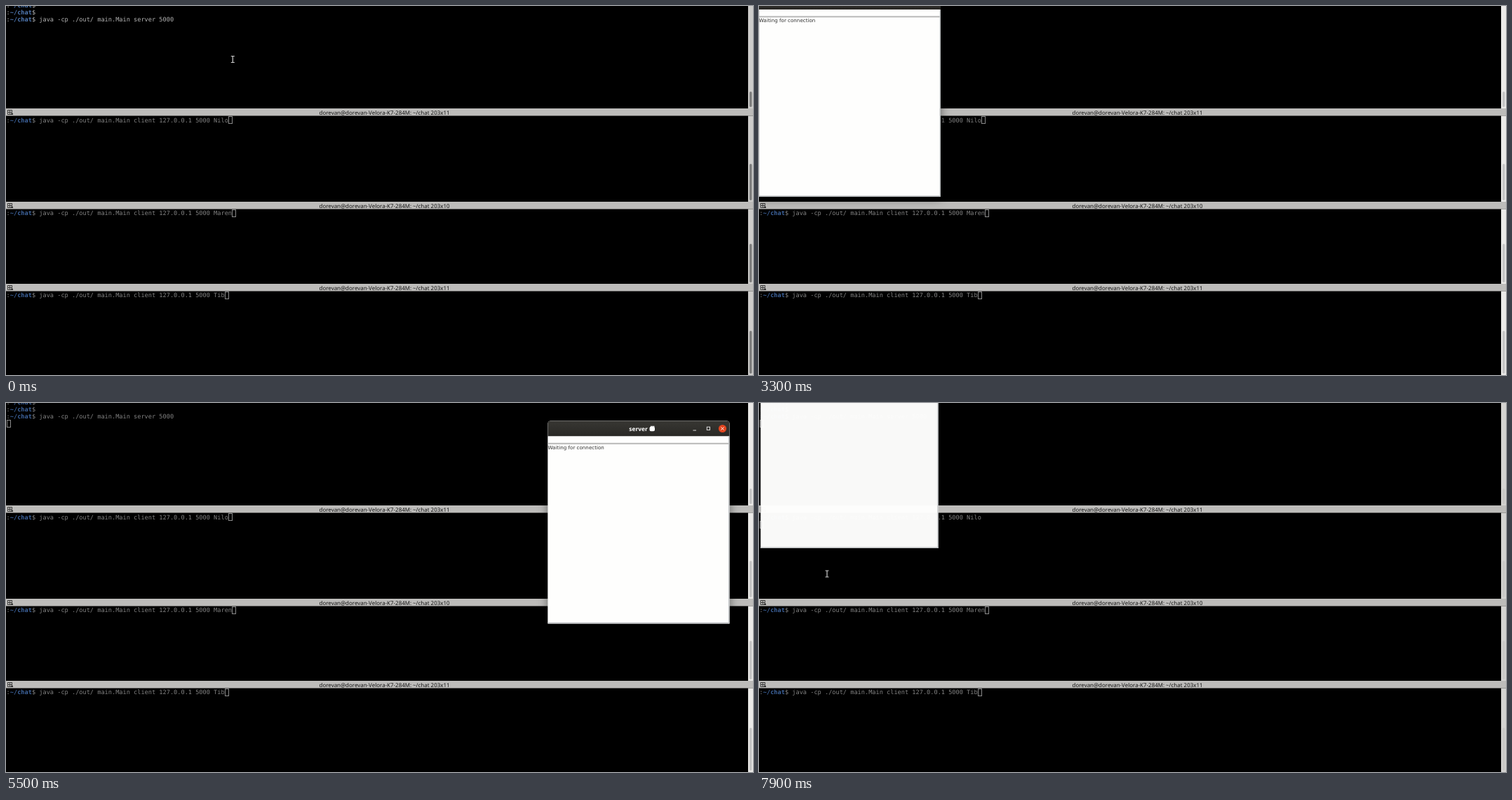
An HTML page with a canvas that plays this animation: 1065 by 526 pixels, repeating every 8 s.

```html
<!DOCTYPE html>
<html lang="en">
<head>
<meta charset="utf-8">
<title>Chat terminals</title>
<style>
html, body { margin: 0; width: 100%; height: 100%; overflow: hidden; background: #000; }
canvas { display: block; }
</style>
</head>
<body>
<canvas id="stage" width="1065" height="526"></canvas>
<script>
const ctx = document.getElementById('stage').getContext('2d');
ctx.textRendering = 'geometricPrecision';

const LOOP = 8000, STEP = 100;
const CELL = 5.19, LEFT = 0.6, ROW = 10.3;
const MONO = '8.62px "DejaVu Sans Mono", monospace';
const WIN_W = 259, WIN_H = 289;
const CLIENT = 'java -cp ./out/ main.Main client 127.0.0.1 5000 ';

// top / bottom of the text area, first full row, scrollbar thumb
const panes = [
  { top: 0, end: 146, row: 14, thumb: [122, 144], cmd: 'java -cp ./out/ main.Main server 5000' },
  { top: 156.5, end: 279, row: 157.3, thumb: [225, 277], cmd: CLIENT + 'Nilo', size: '203x11' },
  { top: 289.5, end: 396, row: 290.2, thumb: [339, 394], cmd: CLIENT + 'Maren', size: '203x10' },
  { top: 406.5, end: 526, row: 407.2, thumb: [463, 524], cmd: CLIENT + 'Tib', size: '203x11' }
];

// time, x, y of the server window
const winPath = [
  [3900, 0, -17], [4000, 0, 0], [4100, 0, 17], [4200, 0, 25],
  [4800, 0, 25], [4900, 60, 27], [5100, 344.5, 31], [5300, 600, 28.5],
  [5500, 772.5, 25.5], [5700, 791.5, 21], [5800, 793, 13], [5900, 794, 8]
];
const mousePath = [[5900, 924, 18], [6100, 700, 85], [6300, 360, 175], [6400, 323, 188]];

function along(path, t) {
  if (t <= path[0][0]) return path[0].slice(1);
  for (let i = 1; i < path.length; i++) {
    const [t0, x0, y0] = path[i - 1], [t1, x1, y1] = path[i];
    if (t <= t1) {
      const k = (t - t0) / (t1 - t0);
      return [x0 + (x1 - x0) * k, y0 + (y1 - y0) * k];
    }
  }
  return path[path.length - 1].slice(1);
}

function rect(x, y, w, h, color) {
  ctx.fillStyle = color;
  ctx.fillRect(x, y, w, h);
}

function frame(x, y, w, h, color, width = 1) {
  ctx.strokeStyle = color;
  ctx.lineWidth = width;
  ctx.strokeRect(x, y, w, h);
}

function text(str, x, y, font, color, align = 'left') {
  ctx.font = font;
  ctx.fillStyle = color;
  ctx.textAlign = align;
  ctx.fillText(str, x, y);
}

function line(width, color, ...points) {
  ctx.strokeStyle = color;
  ctx.lineWidth = width;
  ctx.beginPath();
  for (let i = 0; i < points.length; i += 4) {
    ctx.moveTo(points[i], points[i + 1]);
    ctx.lineTo(points[i + 2], points[i + 3]);
  }
  ctx.stroke();
}

function prompt(cellTop, cmd, bright) {
  const y = cellTop + 8.2, color = bright ? '#b4b4b4' : '#828282';
  text(':', LEFT, y, MONO, color);
  text('~/chat', LEFT + CELL, y, 'bold ' + MONO, bright ? '#5079b4' : '#3d639c');
  text('$ ' + cmd, LEFT + 7 * CELL, y, MONO, color);
}

function caret(col, cellTop, style) {
  const x = Math.round(LEFT + col * CELL), y = Math.round(cellTop);
  if (style === 'solid') rect(x, y, 5.5, 10.3, '#b4b4b4');
  if (style === 'hollow') frame(x + 0.5, y + 0.5, 5, 10, '#8a8a8a');
}

function titleBar(y, size) {
  rect(0, y, 1065, 10.5, '#bdbcba');
  frame(2.5, y + 2.5, 6, 6, '#333', 0.9);
  line(0.9, '#333', 5.5, y + 2.5, 5.5, y + 8.5, 2.5, y + 5.5, 8.5, y + 5.5);
  rect(7, y + 7, 3, 2, '#333');
  text('dorevan@dorevan-Velora-K7-284M: ~/chat ' + size, 539.5, y + 8.6,
    '7.93px "Noto Sans", sans-serif', '#111', 'center');
}

function scrollbar(pane, t) {
  const active = t < 2400 || (t >= 6600 && t < 7900);
  const fading = t >= 7900 || (t >= 2400 && t < 2700);
  rect(1058, pane.top, 7, pane.end - pane.top, active ? '#cecdcb' : fading ? '#d4d3d1' : '#ebeae8');
  if (t >= 2400 && t < 2700) return;
  const [a, b] = pane.thumb;
  ctx.fillStyle = active ? '#7d7d7d' : fading ? '#c9c8c6' : '#c4c4c4';
  ctx.beginPath();
  ctx.roundRect(1060, a, 3.5, b - a, 1.7);
  ctx.fill();
}

function terminals(t) {
  const focus = t < 2400 ? 0 : t >= 6600 && t < 7900 ? 1 : -1;
  const entered = [t >= 2000, t >= 7000];
  const blinkOn = focus ? t < 7700 : t >= 2000 || (t >= 300 && t < 900) || t >= 1500;
  panes.forEach((p, i) => {
    if (p.size) titleBar(p.top - 10.5, p.size);
    if (!i) {
      prompt(p.row - 2 * ROW, '', focus === 0);
      prompt(p.row - ROW, '', focus === 0);
    }
    prompt(p.row, p.cmd, focus === i);
    const style = focus !== i ? 'hollow' : blinkOn ? 'solid' : 'none';
    caret(entered[i] ? 0 : 9 + p.cmd.length, p.row + (entered[i] ? ROW : 0), style);
    scrollbar(p, t);
  });
}

// App window centred on (cx, cy), growing and fading in with s
function appWindow(cx, cy, s, title, message) {
  ctx.save();
  ctx.globalAlpha = s;
  ctx.translate(cx, cy);
  ctx.scale(s, s ** 0.95);
  ctx.translate(-WIN_W / 2, -WIN_H / 2);

  ctx.save();
  ctx.beginPath();
  ctx.roundRect(0, 0, WIN_W, WIN_H, [4, 4, 0, 0]);
  if (s === 1) {
    ctx.shadowColor = 'rgba(0,0,0,.5)';
    ctx.shadowBlur = 14;
    ctx.shadowOffsetY = 2;
    ctx.fillStyle = '#fefefd';
    ctx.fill();
    ctx.shadowColor = 'transparent';
  }
  ctx.clip();
  const bar = ctx.createLinearGradient(0, 0, 0, 22);
  bar.addColorStop(0, '#383733');
  bar.addColorStop(1, '#292825');
  rect(0, 0, WIN_W, 22, bar);
  rect(0, 22, WIN_W, WIN_H - 22, '#fefefd');
  rect(0, 31.3, WIN_W, 2, '#b9b9b9');
  rect(WIN_W - 1.5, 22, 1.5, WIN_H - 22, '#bcbfc1');
  rect(0, WIN_H - 1.7, WIN_W, 1.7, '#bcbfc1');
  rect(0, 22, 0.6, WIN_H - 22, '#c8c8c8');
  ctx.restore();

  text(title, 129, 14.2, 'bold 8.4px "Noto Sans", sans-serif', '#fff', 'center');
  line(1, '#ddd', 207, 13.5, 211.5, 13.5);
  frame(226.8, 8.7, 4.2, 4.2, '#ddd');
  ctx.fillStyle = '#e2451f';
  ctx.beginPath();
  ctx.arc(249, 11, 5.6, 0, 7);
  ctx.fill();
  line(1, '#fff', 247, 9, 251, 13, 251, 9, 247, 13);
  text(message, 0, 40.4, '7.14px "DejaVu Sans", sans-serif', '#333');
  ctx.restore();
}

function beam(x, y) {
  line(1.2, '#ccc', x, y - 4, x, y + 4,
    x - 2.5, y - 4.5, x + 2.5, y - 4.5, x - 2.5, y + 4.5, x + 2.5, y + 4.5);
}

function hand(x, y) {
  ctx.fillStyle = '#fff';
  ctx.strokeStyle = '#222';
  ctx.lineWidth = 0.7;
  ctx.beginPath();
  ctx.roundRect(x - 3.5, y - 2.5, 7.5, 6.5, 2);
  for (let i = 0; i < 3; i++) ctx.roundRect(x - 2 + i * 1.9, y - 3.8, 1.6, 4, 0.8);
  ctx.stroke();
  ctx.fill();
}

function mouse(t, x, y) {
  if (t < 2000) beam(323.3, 76);
  else if (t >= 3100 && t < 3300) beam(276, 30);
  else if (t >= 4000 && t < 4500) hand(156, y + 3);
  else if (t >= 4500 && t < 5900) hand(x + 142.5 + 6 * Math.min(1, x / 700), y + 10.8);
  else if (t >= 5900 && t < 7000) {
    const [mx, my] = along(mousePath, t);
    (mx > 794 ? hand : beam)(mx, my);
  } else if (t >= 7900) beam(97, 243.5);
}

function draw(now) {
  const t = Math.floor((now % LOOP) / STEP) * STEP;
  rect(0, 0, 1065, 526, '#000');
  terminals(t);
  const [x, y] = along(winPath, t);
  if (t >= 2400 && t < 6600) {
    const grow = [0.1, 0.548, 0.93][(t - 2400) / STEP] ?? 1;
    appWindow(x + WIN_W / 2, y + WIN_H / 2, grow, 'server', 'Waiting for connection');
  }
  if (t >= 7900) appWindow(129, 65.5, 0.979, 'client', '');
  mouse(t, x, y);
}

const start = performance.now();
function tick() {
  draw(performance.now() - start);
  requestAnimationFrame(tick);
}
tick();
</script>
</body>
</html>
```
